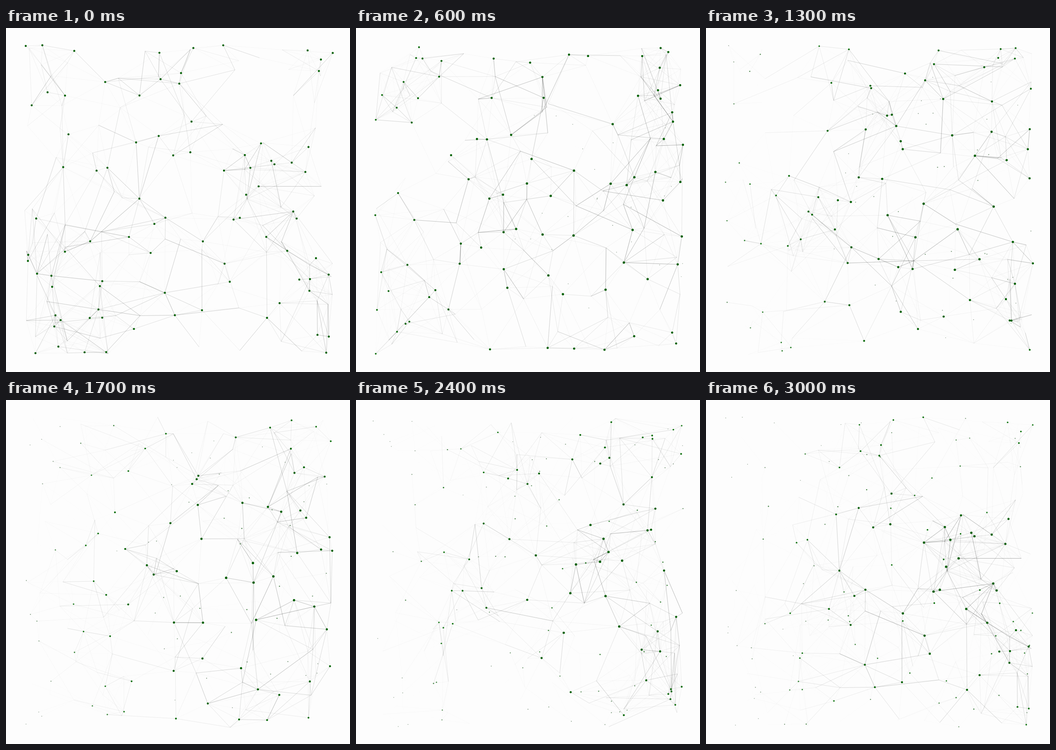
These frames come from a looping animation (748x748 px, 3100 ms). An HTML page with a canvas:

```html
<!DOCTYPE html>
<html lang="en">
<head>
<meta charset="utf-8">
<title>Pulsing network</title>
<style>
  html, body { margin: 0; width: 100%; height: 100%; overflow: hidden; background: #fdfdfd; }
  canvas { display: block; }
</style>
</head>
<body>
<canvas id="stage" width="748" height="748"></canvas>
<script>
const ctx = document.getElementById('stage').getContext('2d');
const SIZE = 748, STEP = 100, STEPS = 31, PHASES = 10;
const NODES = 86, CROWDED = 0.5, REACH = 150;
const MIN = 37, MAX = 712;

let seed = 90125;
function random() {
  seed = (Math.imul(seed, 1664525) + 1013904223) >>> 0;
  return seed / 4294967296;
}

const clamp = (v, lo, hi) => Math.max(lo, Math.min(hi, v));
const mix = (a, b, f) => a + (b - a) * f;
const point = (x, y) => ({ x, y });
const distance = (a, b) => Math.hypot(a.x - b.x, a.y - b.y);
const spread = amount => (random() + random() + random() - 1.5) * amount;
const fold = v => v < MIN ? 2 * MIN - v : v > MAX ? 2 * MAX - v : v;
const near = (p, amount) => point(fold(p.x + spread(amount)), fold(p.y + spread(amount)));

// Hubs that fire in several phases, and spots where nodes crowd together.
const hubs = [point(201, 612), point(651, 313), point(474, 310), point(290, 371)];
const crowds = [point(115, 75), point(110, 660), point(670, 110), point(685, 590),
                point(400, 120), point(265, 420), point(80, 480), point(600, 300)];

// Coordinates lean a little towards the rim of the field.
function scatter() {
  const u = random();
  return mix(MIN, MAX, mix(u, (1 - Math.cos(Math.PI * u)) / 2, 0.25));
}

function pickFree(nodes) {
  const tries = [0, 1, 2].map(() => point(scatter(), scatter()));
  const gap = p => Math.min(...nodes.map(node => distance(p, node)));
  return tries.reduce((best, p) => gap(p) > gap(best) ? p : best);
}

function makePhase(index) {
  const nodes = index % 5 < 2 ? [...hubs] : [];
  const spots = crowds.map(spot => near(spot, 50));
  while (nodes.length < NODES) {
    const spot = spots[Math.floor(random() * spots.length)];
    nodes.push(random() < CROWDED ? near(spot, 130) : pickFree(nodes));
  }
  return nodes;
}

// Nodes within reach are joined at random; the closest few always are.
function connect(from, to, sure, chance) {
  const edges = [];
  for (const a of from) {
    const others = to.filter(b => b !== a).sort((b, c) => distance(a, b) - distance(a, c));
    others.forEach((b, rank) => {
      const inReach = distance(a, b) < REACH && random() < chance;
      if (rank < sure || inReach) edges.push({ a, b, weight: 0.05 + 0.4 * random() ** 4 });
    });
  }
  return edges;
}

const phases = Array.from({ length: PHASES }, (_, i) => makePhase(i));
const links = phases.map((nodes, i) => [
  ...connect(nodes, phases[(i + 1) % PHASES], 4, 0.5),
  ...connect(nodes, nodes, 1, 0.05)
]);

// Activity starts level and drains towards the left and the rim.
function radius(node, progress) {
  const base = 2.2 + 0.4 * Math.min(1, progress * 5);
  const drain = Math.min(1, progress * 1.6);
  const dx = (node.x - 520) / 450, dy = (node.y - 390) / 350;
  return Math.max(0.8, base - drain * (1.6 * dx * dx + 0.75 * dy * dy));
}

function nodeColor(r) {
  const pale = clamp((1.7 - r) / 0.8, 0, 1);
  const light = clamp((2.2 - r) / 0.6, 0, 1);
  const red = mix(15 * light, 125, pale);
  const green = mix(95 + 25 * light, 145, pale);
  return `rgb(${red},${green},${red})`;
}

function drawLayer(index, size) {
  ctx.lineWidth = 0.55;
  for (const { a, b, weight } of links[index]) {
    const strength = (size(a) + size(b)) / 4.4;
    const alpha = Math.min(0.6, weight * strength ** 3);
    if (alpha < 0.01) continue;
    ctx.strokeStyle = `rgba(20,24,20,${alpha})`;
    ctx.beginPath();
    ctx.moveTo(a.x, a.y);
    ctx.lineTo(b.x, b.y);
    ctx.stroke();
  }
  for (const node of phases[index]) {
    const r = size(node);
    if (r < 0.7) continue;
    ctx.fillStyle = nodeColor(r);
    ctx.beginPath();
    ctx.arc(node.x, node.y, r, 0, Math.PI * 2);
    ctx.fill();
  }
}

function draw(step) {
  const progress = step / (STEPS - 1);
  const phase = step % PHASES;
  const active = node => radius(node, progress);
  const echo = node => Math.max(0, active(node) - 2 + 1.2 * progress);
  ctx.fillStyle = '#fdfdfd';
  ctx.fillRect(0, 0, SIZE, SIZE);
  drawLayer((phase + PHASES / 2) % PHASES, echo);
  drawLayer(phase, active);
}

let shown = -1;
const start = performance.now();
function tick() {
  const step = Math.floor((performance.now() - start) / STEP) % STEPS;
  if (step !== shown) draw(shown = step);
  requestAnimationFrame(tick);
}
tick();
</script>
</body>
</html>
```
